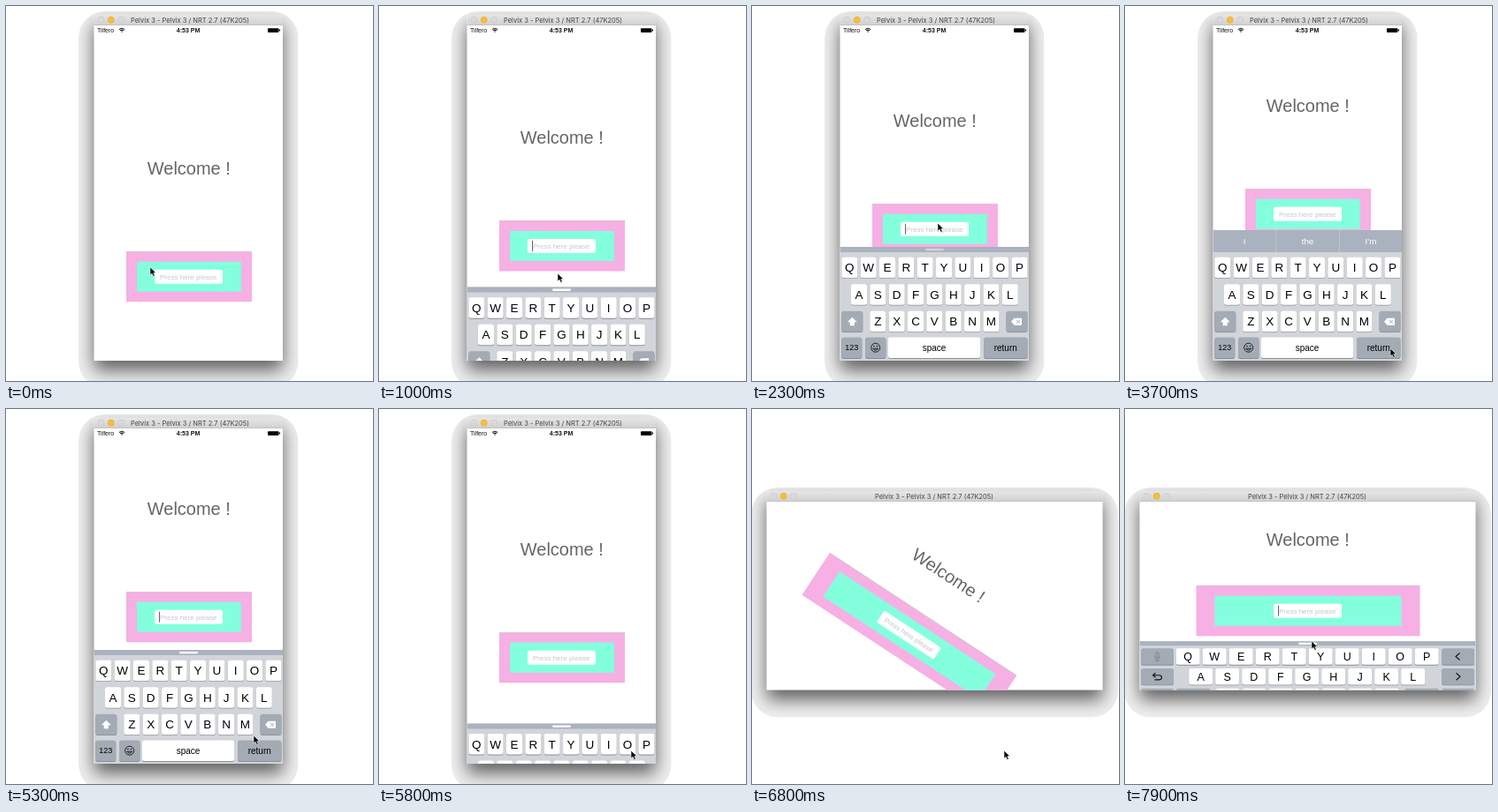
Write an HTML page with a canvas that moves like this. It is 415 px wide and 425 px high and loops after 8000 ms.

```html
<!DOCTYPE html>
<html lang="en">
<head>
<meta charset="utf-8">
<title>Keyboard demo</title>
<style>
  html, body { margin: 0; width: 100%; height: 100%; overflow: hidden; background: #fff; }
  canvas { display: block; }
</style>
</head>
<body>
<canvas id="stage" width="415" height="425"></canvas>
<script>
const c = document.getElementById('stage').getContext('2d');
const LOOP = 8000, STEP = 100, ROTATE_AT = 6700;
const SANS = '"Liberation Sans", Arial, sans-serif';
const GREY_KEY = '#a3abb5';

// time, x, y of the pointer tip
const POINTER = [
  [0, 163, 296], [300, 203, 331], [500, 202, 303], [1000, 202, 303],
  [1700, 208, 276], [2000, 208, 275], [2300, 210, 246], [2400, 212, 250],
  [2600, 230, 328], [3200, 300, 388], [3700, 300, 388], [4400, 212, 256],
  [4700, 212, 262], [4900, 212, 285], [5300, 280, 370], [5600, 285, 387],
  [7000, 285, 387], [7600, 211, 263], [LOOP, 211, 263]
];

// Critically damped spring from 0 to 1
function spring(t, start) {
  const a = Math.max(0, t - start) * 0.0147;
  return 1 - (1 + a) * Math.exp(-a);
}

function pointerAt(t) {
  const i = POINTER.findIndex((p, n) => n && t <= p[0]);
  const [t0, x0, y0] = POINTER[i - 1], [t1, x1, y1] = POINTER[i];
  const u = (t - t0) / (t1 - t0), e = u * u * (3 - 2 * u);
  return [x0 + (x1 - x0) * e, y0 + (y1 - y0) * e];
}

function rect(x, y, w, h, fill, r = 0) {
  c.fillStyle = fill;
  c.beginPath();
  c.roundRect(x, y, w, h, r);
  c.fill();
}

function disc(x, y, r, fill) {
  c.fillStyle = fill;
  c.beginPath();
  c.arc(x, y, r, 0, 7);
  c.fill();
}

function text(str, x, y, size, fill = '#000', align = 'center', font = SANS, weight = '') {
  c.font = `${weight} ${size}px ${font}`;
  c.fillStyle = fill;
  c.textAlign = align;
  c.fillText(str, x, y + size * 0.36);
}

// Runs SVG path data at a position
function shape(path, x, y, fill, stroke, width = 1) {
  const p = new Path2D(path);
  c.save();
  c.translate(x, y);
  c.lineWidth = width;
  if (fill) { c.fillStyle = fill; c.fill(p); }
  if (stroke) { c.strokeStyle = stroke; c.stroke(p); }
  c.restore();
}

function drawWindow(win) {
  const { x, y, w, h } = win;
  c.save();
  c.beginPath();
  c.roundRect(x - 17.5, y - 4, w + 35, h + 35, 30);
  c.clip();
  c.fillStyle = '#efefef';
  c.fill();
  c.shadowColor = 'rgba(0,0,0,.6)';
  c.shadowBlur = 20;
  c.shadowOffsetY = 11;
  rect(x, y, w, h, '#fff', [3, 3, 0, 0]);
  c.restore();

  const bar = c.createLinearGradient(0, y, 0, y + 12);
  bar.addColorStop(0, '#e6e6e6');
  bar.addColorStop(1, '#d0d0d0');
  rect(x, y, w, 12, bar, [3, 3, 0, 0]);
  rect(x, y + 11.5, w, 0.5, '#b4b4b4');
  ['#c4c4c4', '#e0a52c', '#c4c4c4'].forEach((edge, i) => {
    const cx = x + 8 + i * 11.3;
    disc(cx, y + 5.8, 3.7, edge);
    disc(cx, y + 5.8, 3.2, i === 1 ? '#fabd35' : '#d9d9d9');
  });
  text('Pelvix 3 - Pelvix 3 / NRT 2.7 (47K205)', win.titleX, y + 6, 7.5, '#444', 'center', 'Inter, sans-serif');
}

function drawStatusBar() {
  text('Tilfero', 103, 27.6, 7, '#111', 'left');
  for (const r of [4.6, 2.8, 1]) {
    c.strokeStyle = '#111';
    c.lineWidth = 1.1;
    c.beginPath();
    c.arc(131, 30, r, -2.3, -0.84);
    c.stroke();
  }
  text('4:53 PM', 206, 27.6, 7, '#111', 'center', SANS, 'bold');
  rect(296, 25.2, 12.5, 4.8, '#000', 1);
  rect(309, 26.6, 1, 2, '#000');
}

function drawContent(welcomeY, boxY, halfPink, halfMint, caret) {
  text('Welcome !', 206.8, welcomeY, 20, '#666');
  rect(207 - halfPink, boxY - 28.5, halfPink * 2, 57, '#f6b0e4');
  rect(207 - halfPink, boxY - 28.8, halfPink * 2, 0.8, '#cfc4cc');
  rect(207 - halfMint, boxY - 17, halfMint * 2, 34, '#84ffdd');
  rect(168, boxY - 8, 77, 16, '#fff', 2.5);
  text('Press here please', 174, boxY, 8, '#c7c7cd', 'left');
  if (caret) rect(173, boxY - 6, 1, 12, '#666');
}

function key(x, y, w, h, label, size, fill = '#fff') {
  rect(x, y + 0.9, w, h, '#8b8f95', 2.5);
  rect(x, y, w, h, fill, 2.5);
  if (label) text(label, x + w / 2, y + h / 2, size);
}

function letters(str, firstX, pitch, y, w, h, size) {
  [...str].forEach((ch, i) => key(firstX + i * pitch, y, w, h, ch, size));
}

const SHIFT = 'M0-5L5.5 .5H2.6V4.5H-2.6V.5H-5.5Z';
const DELETE = 'M-6 0L-2.5-4H6V4H-2.5Z';

function deleteIcon(x, y) {
  shape(DELETE, x, y, '#fff');
  shape('M0-2L4 2M4-2L0 2', x, y, null, GREY_KEY);
}

function handle(y, alpha) {
  rect(196, y + 2, 21, 2.3, `rgba(255,255,255,${alpha})`, 1.2);
}

// open: 0 = collapsed suggestion bar, 1 = full bar
function drawPortraitKeyboard(top, open, dragging) {
  const x = 99.5, w = 213.5, barTop = top - 19 * open;
  rect(x, top, w, 130, '#d1d5da');
  rect(x, barTop, w, top + 6 - barTop, '#abb2bf');
  if (open > 0.05) {
    c.save();
    c.globalAlpha = open;
    c.beginPath();
    c.rect(x, barTop, w, top + 6 - barTop);
    c.clip();
    ['I', 'the', "I'm"].forEach((word, i) => {
      const cx = 135 + i * 71.5;
      text(word, cx, barTop + 12, 9.8, '#fff');
      if (i) rect(cx - 36, barTop, 0.8, 25, '#c6cbd4');
    });
    c.restore();
  }
  if (open < 0.5) handle(top, dragging ? 0.45 : 1);

  const row = i => top + 11.7 + i * 30.5, h = 23.5;
  letters('QWERTYUIOP', 101.3, 21.35, row(0), 18, h, 13.5);
  letters('ASDFGHJKL', 112, 21.35, row(1), 18, h, 13.5);
  letters('ZXCVBNM', 133.3, 21.35, row(2), 18, h, 13.5);
  key(101.3, row(2), 24, h, '', 0, GREY_KEY);
  shape(SHIFT, 113.3, row(2) + 12, '#fff');
  key(287.5, row(2), 24, h, '', 0, GREY_KEY);
  deleteIcon(299, row(2) + 12);

  const y = top + 102.5;
  key(101.3, y, 23, h, '123', 9, GREY_KEY);
  key(128, y, 23.5, h, '', 0, GREY_KEY);
  shape('M5 0A5 5 0 1 1-5 0A5 5 0 1 1 5 0M-3 1Q0 5 3 1Z', 139.7, y + 11.7, null, '#111', 0.9);
  disc(137.9, y + 10, 0.8, '#111');
  disc(141.5, y + 10, 0.8, '#111');
  key(154, y, 104, h, 'space', 10);
  key(262, y, 49.5, h, 'return', 10, GREY_KEY);
}

function drawLandscapeKeyboard(top) {
  rect(16.5, top, 380, 100, '#d1d5da');
  rect(16.5, top, 380, 5, '#abb2bf');
  handle(top - 0.5, 1);
  const row = i => top + 8 + i * 22.7, h = 18.5;
  letters('QWERTYUIOP', 57.7, 30, row(0), 27, h, 12.5);
  letters('ASDFGHJKL', 72.2, 30, row(1), 27, h, 12.5);
  letters('ZXCVBNM', 102.7, 30, row(2), 27, h, 12.5);
  for (let i = 0; i < 3; i++) {
    key(18, row(i), 37, h, '', 0, GREY_KEY);
    key(358, row(i), 37, h, '', 0, GREY_KEY);
  }
  key(57.7, row(2), 39, h, '', 0, GREY_KEY);
  key(316, row(2), 39, h, '', 0, GREY_KEY);
  const y = row(0) + h / 2, y2 = row(1) + h / 2;
  shape('M-1.5-4.5H1.5V1H-1.5ZM-3 0Q-3 3 0 3T3 0M0 3V5M-2 5H2', 36.5, y, null, '#7f8791');
  shape('M-2-4L-5-1.5L-2 1M-5-1.5H2Q5-1.5 5 1T2 3.7H-3', 36.5, y2, null, '#111', 1.1);
  shape('M2-4L-2.5 0L2 4', 376.5, y, null, '#111', 1.1);
  shape('M-2-4L2.5 0L-2 4', 376.5, y2, null, '#111', 1.1);
}

function drawPointer(x, y) {
  shape('M0 0V9L2.1 7.2L3.7 10.4L5.3 9.6L3.8 6.6H6.6Z', x, y, '#000', '#fff', 0.6);
}

function clipScreen(win) {
  c.beginPath();
  c.rect(win.x, win.y + 12, win.w, win.h - 12);
  c.clip();
}

function drawPortrait(t) {
  const win = { x: 99.5, y: 10, w: 213.5, h: 392, titleX: 208 };
  const hidden = 1 - spring(t, 5650);
  const shown = spring(t, 850) * hidden;
  const expanded = spring(t, 2330);
  const lift = 54 * shown + 17 * expanded * hidden;
  const caret = t >= 850 && t < 5700 && (t - 850) % 1000 < 550;
  drawWindow(win);
  c.save();
  clipScreen(win);
  drawStatusBar();
  drawContent(183.5 - lift, 306.8 - lift, 71, 59, caret);
  if (shown > 0.01) {
    drawPortraitKeyboard(402 - 129 * shown, expanded * (1 - spring(t, 4700)), t >= 2000 && t < 2400);
  }
  c.restore();
}

function drawLandscape(t) {
  const win = { x: 16.5, y: 93, w: 380, h: 225.5, titleX: 206 };
  const shown = spring(t, 7770);
  const turn = Math.max(0, 1 - (t - ROTATE_AT + 70) / 270);
  drawWindow(win);
  c.save();
  clipScreen(win);
  c.translate(206.5, 212);
  c.rotate(turn * Math.PI / 2);
  c.translate(-206.5, -212);
  drawContent(183.5 - 36 * shown / 0.567, 264.8 - 36 * shown / 0.567, 126.5, 105.5, t >= 7770);
  if (shown > 0.01) drawLandscapeKeyboard(318.5 - 97 * shown);
  c.restore();
}

function draw(now) {
  const t = Math.floor((now % LOOP) / STEP) * STEP;
  c.fillStyle = '#fff';
  c.fillRect(0, 0, 415, 425);
  (t < ROTATE_AT ? drawPortrait : drawLandscape)(t);
  drawPointer(...pointerAt(t));
}

let start;
function tick(now) {
  start ??= now;
  draw(now - start);
  requestAnimationFrame(tick);
}
draw(0);
requestAnimationFrame(tick);
</script>
</body>
</html>
```
